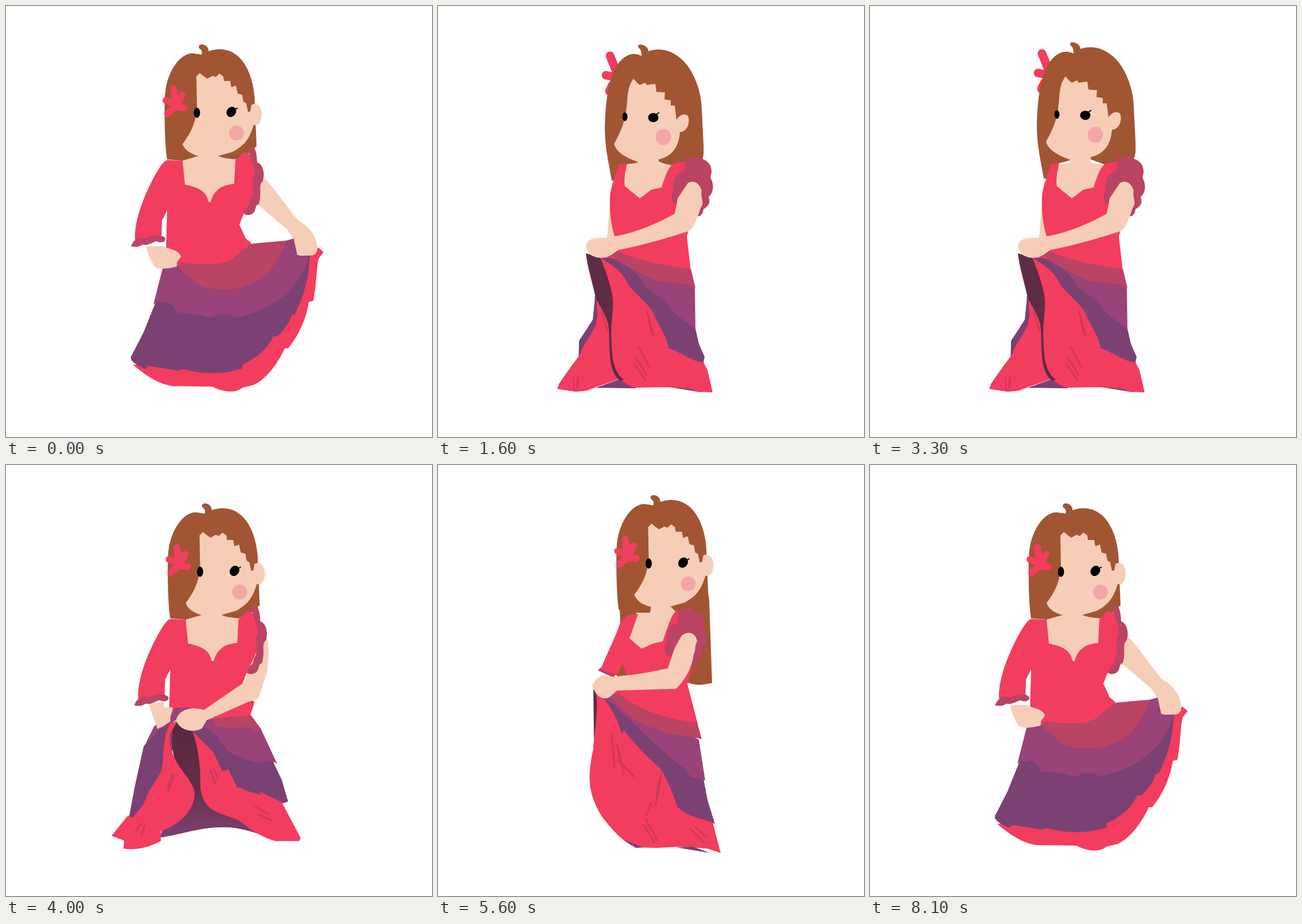
Recreate the animation shown at these times as an HTML page. Size 743 by 753 pixels, loop 8600 ms.

```html
<!DOCTYPE html>
<html lang="en">
<head>
<meta charset="utf-8">
<title>Dancer</title>
<style>
html, body { margin: 0; width: 100%; height: 100%; overflow: hidden; background: #fff; }
svg { display: block; width: 100vw; height: 100vh; }
.pose { visibility: hidden; }
.pose.on { visibility: visible; }
.hair { fill: #a15533; }
.skin { fill: #f6ceb8; }
.red { fill: #f23d5f; }
.rose { fill: #b94464; }
.mauve { fill: #994379; }
.plum { fill: #7b4172; }
.dark { fill: #5f2c45; }
.blush { fill: #f4a6a6; }
.petal { fill: none; stroke: #f23d5f; stroke-width: 12; stroke-linecap: round; }
.wide { stroke-width: 15; }
.lash { stroke: #000; stroke-width: 2; }
.fold { fill: none; stroke: #cd3957; stroke-width: 3; stroke-linecap: round; }
</style>
</head>
<body>
<svg viewBox="0 0 743 753" preserveAspectRatio="none">
<defs>
<linearGradient id="lining" x1="0" y1="0" x2="0" y2="1">
  <stop offset="0" stop-color="#54283e"/><stop offset=".6" stop-color="#653049"/><stop offset="1" stop-color="#7d4173"/>
</linearGradient>

<g id="head">
  <path class="hair" d="M281 268C277 245 276 190 277 160C279 112 307 79 328 83L341 85C343 78 340 76 337 74C335 70 337 67 342 67C350 68 354 74 353 79C372 72 392 75 407 90C425 108 434 140 434 172L437 245L412 268C395 268 380 266 370 262L336 262L308 270Z"/>
  <path class="skin" d="M332 123L338 117L344 122L351 127L360 122L366 124L372 118L379 123L380 131L391 131L393 142L401 139L404 153L412 155L414 167L419 170L422 185L426 184L428 173C433 169 445 170 446 188C446 204 439 210 432 208C425 230 418 243 395 255L370 262L336 262C322 259 311 251 308 241C322 223 332 203 333 175Z"/>
  <path class="petal" d="M296 172L292 144M298 170L307 156M300 176L311 178M296 176L282 188M296 172L279 165"/>
  <ellipse cx="333" cy="186.500" rx="5.500" ry="9"/>
  <ellipse cx="393" cy="185" rx="8" ry="9.500" transform="rotate(35 393 185)"/>
  <path class="lash" d="M398 182L404 178"/>
  <ellipse class="blush" cx="402" cy="222" rx="13" ry="13"/>
</g>

<g id="turnedHead">
  <path class="petal wide" d="M300 87L310 112M293 121L308 124M299 149L304 138"/>
  <path class="hair" d="M308 306L303 305C300 285 291 250 291 215C292 165 298 105 328 88C338 82 346 83 355 87C355 80 354 76 350 73C347 69 351 66 357 68C364 70 367 75 367 79C385 73 403 76 420 89C445 107 460 150 460 180L463 240C464 262 463 272 452 280L412 282L385 272L348 274L318 282Z"/>
  <path class="skin" d="M341 127L347 134L352 138L361 134L364 138L379 136L381 150L396 151L395 163L406 165L406 174L413 174L416 199C421 190 430 187 436 192C441 204 434 220 422 220C420 248 407 263 385 268L385 280L348 280L348 272C330 266 311 256 307 241C322 214 327 200 330 165C331 145 335 135 341 127Z"/>
  <ellipse cx="326" cy="193.500" rx="4.500" ry="7.500"/>
  <ellipse cx="375.500" cy="195" rx="9" ry="8"/>
  <path class="lash" d="M380 190L386 186"/>
  <ellipse class="blush" cx="393" cy="229" rx="13.500" ry="14"/>
</g>

<g id="bust">
  <path class="skin" d="M336 258L370 258L405 266L402 320L355 345L306 316L304 266Z"/>
  <use href="#head"/>
  <path class="red" d="M281 269L308 270L312 312C338 317 350 325 353 342L357 343C361 324 375 312 398 311L400 270L415 255L432 262L440 330L414 364L407 382L418 406L428 414L418 446L390 455L300 454L279 430L281 357L272 375L271 407L225 408C223 370 247 318 262 292C270 279 274 272 281 269Z"/>
  <path class="rose" d="M218 420C224 404 235 403 246 406C255 398 273 399 278 406C278 414 268 414 262 411C254 414 246 419 238 417C231 422 224 421 218 420Z"/>
</g>
<path id="frill" class="rose" d="M424 248C430 241 437 246 438 273C448 276 452 292 448 306C439 314 447 325 441 346C434 347 437 354 432 361C426 367 417 366 414 362L421 350C428 347 424 340 430 333C434 318 426 312 434 293C433 277 427 270 424 257Z"/>
<path id="leftHand" class="skin" d="M244 420L272 419C284 425 300 425 305 437C305 442 296 444 298 455C288 458 270 461 261 457C253 447 248 435 244 420Z"/>
<path id="puff" class="rose" d="M430 270C435 262 450 262 460 267C474 270 481 286 475 299C482 312 481 325 472 334C477 346 468 352 463 355C462 365 456 369 452 367L458 320C450 305 435 305 430 320C420 325 428 338 416 347C405 345 406 329 412 320C408 308 414 292 424 290C434 288 430 280 430 270Z"/>

<g id="front">
  <path class="red" d="M222 627C250 651 270 661 290 664L360 665C380 675 400 677 412 667L432 662C452 653 474 626 486 598L492 598C511 576 525 542 528 517L536 515C543 480 541 452 546 440L554 430L545 422L528 436L400 600Z"/>
  <path class="plum" d="M262 515L240 570L220 609C214 617 219 623 243 634L249 629L300 637L308 634C345 645 385 643 412 633L413 626C440 614 458 596 466 577L474 577C488 563 497 549 497 541L504 538C518 510 528 480 530 435L500 440L400 510L290 510Z"/>
  <path class="mauve" d="M274 455L257 522L264 516L270 519L280 516L292 524L298 535L340 540L358 545C372 536 390 535 400 544C440 538 475 518 497 494C515 475 525 455 528 436L512 436L508 408L488 412L400 450L300 452Z"/>
  <use href="#bust"/>
  <path class="rose" d="M300 456L305 448C340 452 375 455 395 442C410 428 418 421 430 415L488 410C480 440 455 474 435 482C400 500 360 498 335 487Z"/>
  <path class="skin" d="M436 349L446 303L454 303C475 329 492 353 508 373C527 384 542 402 542 417C545 430 540 436 530 436L508 435L502 408L491 391L442 349Z"/>
  <path class="mauve" d="M485 411L502 406L503 425L495 414Z"/>
  <use href="#frill"/>
  <use href="#leftHand"/>
</g>

<g id="lift">
  <use href="#bust" x="5.500"/>
  <path fill="url(#lining)" d="M404 466L436 474L424 560L400 600L429 655L429 667C408 662 390 656 370 651C330 644 290 646 266 654L290 620L345 600L360 510Z"/>
  <path class="plum" d="M277 453L263 526L230 590L310 590L365 520L404 464L400 441L315 444Z"/>
  <path class="red" d="M404 461C382 475 365 488 357 508C345 525 350 530 340 541C325 562 310 573 295 577L277 577L272 585L228 590L212 613L184 649C204 661 235 666 262 660C270 650 280 640 305 632C342 622 367 607 368 572C366 540 372 500 404 466Z"/>
  <path class="mauve" d="M276 453L262 523L270 524C300 516 330 505 345 488C360 477 380 468 402 441L315 442Z"/>
  <path class="plum" d="M402 443L350 485L330 506L345 500C360 480 385 472 404 463Z"/>
  <path class="rose" d="M304 457L315 444L394 441L375 458L347 457L328 470Z"/>
  <path class="plum" d="M434 470L440 490L463 550L473 636L440 610L416 530Z"/>
  <path class="mauve" d="M436 445L440 447L457 508L449 510L434 488Z"/>
  <path class="red" d="M434 477C424 510 382 548 376 582C375 602 399 625 424 640L428 670C440 685 460 692 479 690L473 634L464 607L450 590L442 585L436 560L428 548Z"/>
  <path class="fold" d="M355 530L343 568M351 527L345 556M408 542L404 568M420 550L410 586M260 632L286 627M255 622L278 618M262 608L278 606M450 638L458 664M456 642L464 667"/>
  <path class="skin" d="M447 303L455 303C462 330 467 360 469 390L437 440L438 478C430 486 412 483 404 478C403 466 396 455 398 443C410 440 417 420 422 408L435 378L434 355Z"/>
  <use href="#frill" x="5.500"/>
  <use href="#leftHand" x="5.500"/>
</g>

<g id="cross">
  <use href="#bust" x="5.500"/>
  <path fill="url(#lining)" d="M283 465L296 449L326 462L360 560L390 610L450 648C430 640 400 632 380 633C340 632 310 645 268 651L275 630L310 590L300 540Z"/>
  <path class="plum" d="M266 457L240 492L225 560L214 618L240 617L290 560L290 450L325 425L296 424Z"/>
  <path class="mauve" d="M258 457L241 492L268 462L300 444L318 423L290 428Z"/>
  <path class="red" d="M286 452C270 477 278 525 268 540L249 571L238 596L220 617L213 612L184 648L206 656L205 670C225 674 250 668 270 657L270 640C300 630 328 605 329 575C328 545 283 525 286 470L300 446Z"/>
  <path class="plum" d="M325 464L365 450L444 460L468 523L481 550L492 588L480 592L440 600L380 580L345 500Z"/>
  <path class="red" d="M325 465C335 490 340 530 339 565C345 605 370 607 405 620C430 640 450 652 470 657L511 657L514 652L481 589L443 571L446 576C420 572 410 562 403 563L388 532L377 535L362 502Z"/>
  <path class="mauve" d="M328 464L340 446L427 437L444 460L473 522L462 516L440 520C400 512 380 495 365 480Z"/>
  <path class="plum" d="M328 462L342 454L368 474C372 485 378 486 384 494L350 490Z"/>
  <path class="rose" d="M362 445L425 437L444 460L437 464L420 457C400 465 385 455 365 458Z"/>
  <path class="skin" d="M447 304L456 304C460 325 457 345 456 360L440 408L420 415L350 446L342 460C325 470 300 462 297 445C300 430 320 420 345 428L415 380L424 355Z"/>
  <use href="#frill" x="5.500"/>
  <path class="skin" d="M249 418L273 413L278 424L290 423C293 430 285 436 287 448C280 452 270 460 264 461Z"/>
  <path class="fold" d="M294 542L283 570M290 540L282 564M356 532L366 558M362 530L370 550M435 597L458 610M440 610L465 622M226 640L236 626M236 648L242 630"/>
</g>

<g id="turnedBody">
  <path class="skin" d="M299 355L295 405L312 412L306 370Z"/>
  <path class="plum" d="M275 495L270 548L246 585L245 620L280 610L290 545ZM275 667L322 650L345 668ZM398 665L448 667L460 675Z"/>
  <path class="red" d="M262 436L300 432L340 430L420 500L455 600L463 622L470 636L479 675L455 674C430 663 380 667 340 667L315 652L275 666L260 672L240 674L208 669L211 660L232 630L247 610C258 580 276 570 278 540L276 500Z"/>
  <path class="dark" d="M258 432C260 455 270 485 275 510C285 530 297 545 298 565C300 610 298 640 318 655L324 653C306 637 303 620 302 570C303 540 308 520 303 500C297 475 290 455 283 440Z"/>
  <path class="plum" d="M283 440C310 455 325 470 332 487C350 510 375 525 380 548C390 565 400 580 402 598C420 603 445 622 463 623L465 613L455 590L447 555L330 440Z"/>
  <path class="mauve" d="M297 437C330 455 350 465 362 490C380 505 400 515 410 535L449 565L448 488L320 430Z"/>
  <path class="skin" d="M324 277L348 274L348 264L385 264L385 274L408 278L391 321L352 338L322 316Z"/>
  <path class="red" d="M315 277L330 275C326 290 324 305 326 315L352 336L372 321L390 317C395 300 402 281 410 276L435 270L447 360L434 402L441 465L300 440L309 405C300 380 298 340 301 325C305 305 311 292 315 277Z"/>
  <path class="rose" d="M296 431L312 428C350 445 400 455 441 459L449 492C420 480 400 485 375 478C350 465 330 457 296 431Z"/>
  <use href="#puff"/>
  <path class="skin" d="M436 309C450 302 457 314 460 322C457 335 466 342 458 353C452 372 446 390 436 394C400 405 350 420 315 426L305 433C288 446 260 440 258 420C260 405 275 405 290 405L310 402C350 395 385 378 413 363L418 336Z"/>
  <path class="fold" d="M365 535L372 568M368 545L376 577M349 595L369 630M344 612L364 645M343 626L362 654M287 535L296 570M236 650L237 670M244 650L243 670"/>
</g>

<g id="tall">
  <path class="hair" d="M314 150L318 283L312 370L345 371L435 380C450 386 464 384 478 381L473 235L465 192Z"/>
  <path class="skin" d="M372 243L402 243L416 258L394 312L355 323L333 304L346 258L370 258Z"/>
  <use href="#head" x="34.500" y="-14.500"/>
  <path class="skin" d="M372 242H402V260H372Z"/>
  <path class="dark" d="M271 390L285 410L280 470L272 484Z"/>
  <path class="red" d="M274 390C282 420 272 470 271 495C259 550 263 575 285 613C305 640 325 660 345 668L380 669L420 667L470 670L493 678L478 620L440 500L310 400Z"/>
  <path class="plum" d="M286 405C300 420 315 445 320 470L325 464C345 490 370 515 388 530C400 550 408 570 418 598C440 618 465 617 483 627L470 585L463 548L330 430ZM322 654L345 669L358 668ZM415 668L445 667L475 678Z"/>
  <path class="mauve" d="M292 405L320 433L345 455L370 480L410 515L430 530L441 545L466 551L455 480L310 400Z"/>
  <path class="red" d="M330 263L349 260L334 303L355 321L375 312L392 308C400 285 405 265 415 255L440 250L445 350L435 383L453 452L400 455L300 405L330 370L322 347L312 368L283 358C297 325 312 295 318 275Z"/>
  <path class="rose" d="M299 404L315 398C340 425 400 445 452 450L460 479C430 470 400 475 380 460C345 455 325 430 299 404ZM283 354L291 360L309 365L307 372L279 359Z"/>
  <use href="#puff" x="-12" y="-12"/>
  <path class="skin" d="M425 298C438 288 450 295 452 308C447 315 450 325 446 330C444 352 430 378 415 391L312 394L300 405C288 412 275 405 269 385C275 372 285 364 300 370C340 368 380 360 401 355L412 322Z"/>
  <path class="fold" d="M303 472L308 530M312 488L324 541M313 515L343 545M390 535L383 580M384 555L380 595M372 590L363 612M362 618L382 656M360 630L377 659M448 632L468 650M440 636L464 660"/>
</g>

<g id="swingSkirt">
  <path class="red" d="M278 398L420 405L484 388C510 385 545 377 583 382C570 420 562 470 551 516L540 513C525 560 500 600 480 618C470 628 460 630 450 627C430 645 400 655 360 652L270 658L250 655L240 660L238 655L250 635L340 480L262 460Z"/>
  <path class="plum" d="M238 485L340 460L408 412L422 418C400 450 380 475 350 492L310 500L260 517L217 512Z"/>
  <path class="rose" d="M262 457C310 445 360 440 392 408L404 410C395 440 370 460 345 475L280 486L235 486Z"/>
  <path class="mauve" d="M258 522L251 602L300 585L360 560L420 490L440 395C415 430 385 475 310 498Z"/>
  <path class="red" d="M222 513L208 526C225 536 240 550 252 563L258 560L259 530C290 520 310 505 340 500C390 480 410 450 440 398L422 410C405 450 380 475 340 487C305 488 280 515 222 513Z"/>
  <path class="plum" d="M252 600L237 644L290 638C300 618 335 625 350 625C380 610 400 580 444 560C450 540 452 490 463 479L478 482C482 440 486 410 484 388L475 390L438 397C430 430 420 475 385 510C370 540 350 555 300 573L298 567Z"/>
  <path class="fold" d="M502 443C500 465 495 485 486 505M489 485L472 511M480 488L474 505M325 618L318 636M334 620L327 638M340 630L350 637"/>
</g>

<g id="swingBody">
  <path class="red" d="M262 270C275 255 295 255 303 263C312 280 318 300 321 318L356 331C366 322 374 315 374 308L361 275C372 265 382 262 392 264L415 325L395 343L385 375L360 378L329 366L290 400L285 387L268 365C270 335 257 300 262 270Z"/>
  <path class="rose" d="M392 268L402 283L410 298L411 310L416 328L403 333L404 316L392 293ZM281 395L290 389L291 376L310 365L326 356L331 369L312 375L298 387L302 403Z"/>
  <path class="skin" d="M395 345L413 331C425 355 440 365 460 377L480 390L474 402L462 395L440 394L415 382C405 370 400 355 395 345Z"/>
  <path class="skin" d="M298 385C310 372 325 368 335 371C365 377 395 384 425 380L442 390C432 400 425 419 412 420L398 408C365 405 330 405 303 403Z"/>
  <path class="fold" d="M312 303L325 348"/>
</g>
<g id="swingBack">
  <path class="hair" d="M262 150L260 290L254 393L282 393L400 382L431 360L427 240L417 192Z"/>
  <path class="skin" d="M322 256L352 256L364 275L376 310L356 333L318 320L303 265Z"/>
  <use href="#head" x="-15" y="-2.500"/>
  <path class="skin" d="M263 648L288 648L286 672L263 672ZM352 648L378 650L400 670L365 670Z"/>
  <path class="rose" d="M262 667C270 672 280 668 287 665L284 680L277 683L262 683ZM349 655L358 655C365 670 380 668 398 670L405 681L370 682L358 668L357 682L352 682Z"/>
</g>
<g id="swing"><use href="#swingBack"/><use href="#swingSkirt"/><use href="#swingBody"/></g>
</defs>

<g class="pose" data-pose="front"><use href="#front"/></g>
<g class="pose" data-pose="lift"><use href="#lift"/></g>
<g class="pose" data-pose="cross"><use href="#cross"/></g>
<g class="pose" data-pose="turn"><use href="#turnedHead"/><use href="#turnedBody"/></g>
<g class="pose" data-pose="hold"><use href="#turnedHead" y="-4"/><use href="#turnedBody"/></g>
<g class="pose" data-pose="sway"><use href="#front" x="-4" y="-3"/></g>
<g class="pose" data-pose="rise"><use href="#tall" y="8"/></g>
<g class="pose" data-pose="tall"><use href="#tall"/></g>
<g class="pose" data-pose="sweep"><use href="#swing" x="-7" y="-11"/></g>
<g class="pose" data-pose="swing"><use href="#swing"/></g>
<g class="pose" data-pose="settle" transform="translate(8 0)">
  <use href="#swingBack"/>
  <use href="#swingSkirt" transform="translate(28.600 0) scale(.89 1)"/>
  <use href="#swingBody"/>
</g>
</svg>
<script>
const turnOut = [["front", 500], ["lift", 200], ["cross", 200], ["turn", 200], ["hold", 500]];
const turnBack = [["turn", 200], ["cross", 200], ["lift", 200]];
const schedule = [
  ...turnOut, ...turnBack, ...turnOut, ...turnBack,
  ["front", 500], ["sway", 500], ["rise", 200], ["tall", 1000],
  ["sweep", 500], ["swing", 500], ["settle", 500], ["front", 500]
];
const total = schedule.reduce((sum, [, ms]) => sum + ms, 0);
const poses = [...document.querySelectorAll(".pose")];
const start = performance.now();
let shown = "";

function poseAt(t) {
  for (const [name, ms] of schedule) {
    if (t < ms) return name;
    t -= ms;
  }
}

function draw() {
  const name = poseAt((performance.now() - start) % total);
  if (name !== shown) {
    poses.forEach(p => p.classList.toggle("on", p.dataset.pose === name));
    shown = name;
  }
  requestAnimationFrame(draw);
}
draw();
</script>
</body>
</html>
```
